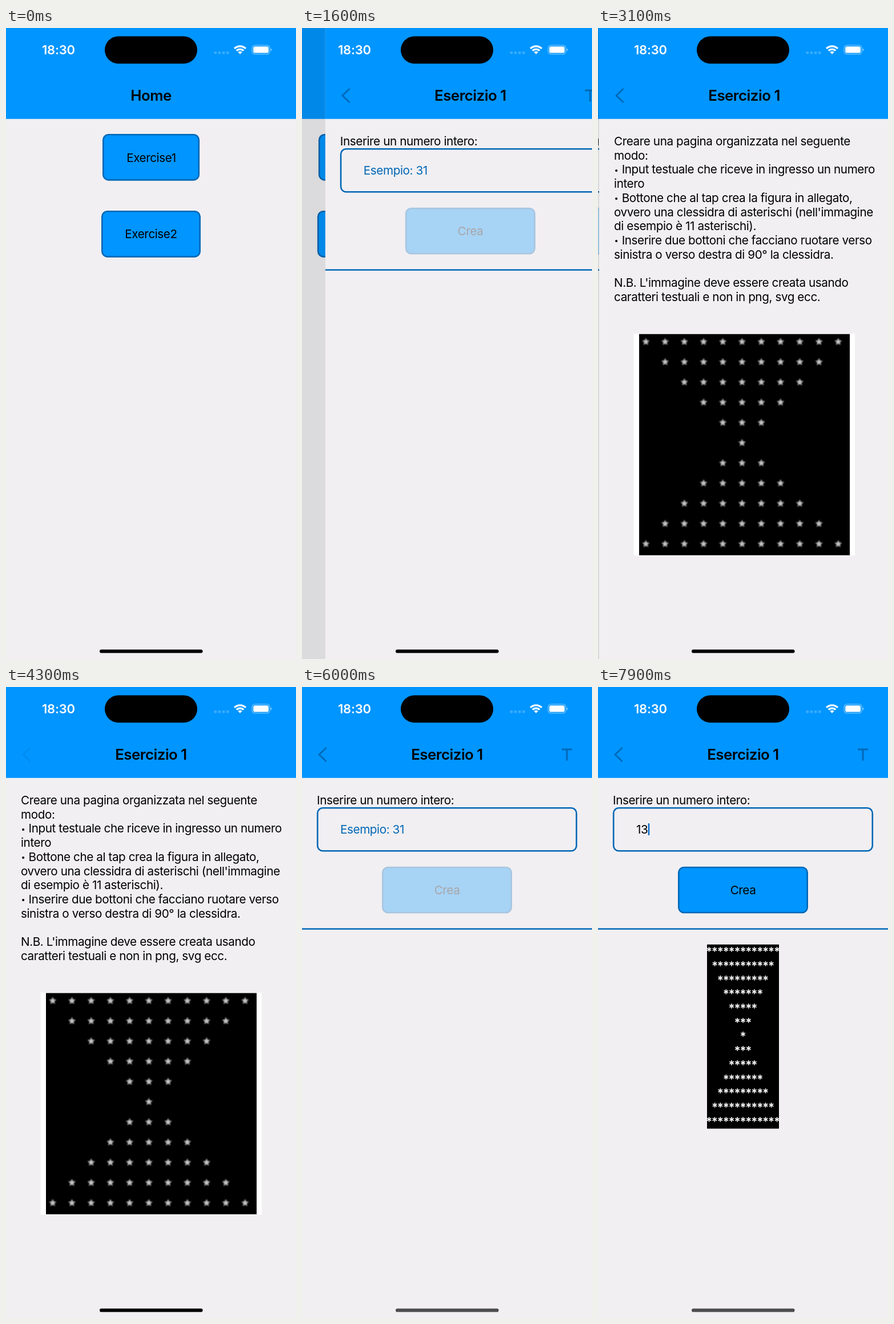
Recreate the animation shown at these times as an HTML page. Size 508 px wide and 1102 px high, loop 8 s.

```html
<!DOCTYPE html>
<html lang="it">
<head>
<meta charset="utf-8">
<title>Esercizio 1</title>
<style>
  html, body { margin: 0; height: 100%; overflow: hidden; background: #f1eff2; }
  svg { display: block; width: 100vw; height: 100vh; }
  text { font: 400 20.68px Inter, "Open Sans", sans-serif; letter-spacing: -.02em; }
  .title { font-size: 25.85px; font-weight: 600; }
  .mid { text-anchor: middle; }
  .clock { font-size: 22px; font-weight: 600; letter-spacing: -.01em; fill: #fff; }
  .page { fill: #f1eff2; }
  .bar { fill: #0095ff; }
  .btn { fill: #0095ff; stroke: #0067b5; stroke-width: 2.6; }
  .icon { fill: none; stroke: #0067b5; stroke-width: 2.6; }
  .stars { font-weight: 600; letter-spacing: -.06em; fill: #fff; }
  .bullet { font-size: 13px; }
</style>
</head>
<body>
<svg viewBox="0 0 508 1102" preserveAspectRatio="none">
  <g id="home">
    <rect class="page" width="508" height="1102"/>
    <rect class="bar" width="508" height="158.8"/>
    <text class="title mid" x="254" y="127">Home</text>
    <g id="first">
      <rect class="btn" x="170.3" y="186.2" width="167.5" height="79.2" rx="9.2"/>
      <text class="mid" x="254.4" y="233.5">Exercise1</text>
    </g>
    <rect class="btn" x="168.3" y="320.2" width="171.4" height="79.2" rx="9.2"/>
    <text class="mid" x="254" y="367">Exercise2</text>
    <rect id="homeShade" width="508" height="1102"/>
  </g>

  <g id="form">
    <rect class="page" width="508" height="1102"/>
    <rect class="bar" width="508" height="158.8"/>
    <path class="icon" d="M42.5 106 30 118 42.5 130"/>
    <text class="title mid" x="254" y="127">Esercizio 1</text>
    <path id="info-icon" class="icon" style="stroke-width:3" d="M455 109H473M464 109V128.5"/>
    <text x="26" y="205">Inserire un numero intero:</text>
    <rect class="icon" x="27.2" y="211.3" width="453.6" height="75" rx="9.2"/>
    <text id="value" x="67" y="256.3"></text>
    <rect id="caret" y="238" width="2.6" height="21" rx="1" fill="#0a6fcc"/>
    <g id="create">
      <rect class="btn" x="141.3" y="315" width="225.4" height="79" rx="9.2"/>
      <text class="mid" x="254" y="362">Crea</text>
    </g>
    <path class="icon" d="M0 422.5H508"/>
    <g id="glass"><rect x="191" y="449.7" width="126" height="321.6"/></g>
    <rect id="formShade" width="508" height="1102"/>
  </g>

  <g id="info">
    <rect class="page" width="508" height="1102"/>
    <rect class="bar" width="508" height="158.8"/>
    <path id="back" class="icon" d="M42.5 106 30 118 42.5 130"/>
    <text class="title mid" x="254" y="127">Esercizio 1</text>
    <g id="lines"></g>
    <rect x="60.5" y="533.5" width="387.5" height="387.8" fill="#fff"/>
    <rect x="70" y="534.5" width="369" height="386.3"/>
    <g id="picture" fill="#c4c4c4" style="filter:blur(1.1px)"></g>
  </g>

  <text class="clock" x="63" y="46">18:30</text>
  <rect x="173" y="14.5" width="162" height="47.8" rx="23.9"/>
  <path d="M364.5 43.2H391" stroke="#fff" stroke-opacity=".22" stroke-width="4.4" stroke-dasharray="4.6 2.6"/>
  <g transform="translate(410 45.8)" fill="none" stroke="#fff" stroke-width="3.2">
    <path d="M-9.9-9.9A14 14 0 0 1 9.9-9.9M-6.2-6.2A8.8 8.8 0 0 1 6.2-6.2"/>
    <path d="M0 0-3.7-3.7A5.3 5.3 0 0 1 3.7-3.7Z" fill="#fff" stroke="none"/>
  </g>
  <rect x="431.1" y="30.1" width="31" height="15.6" rx="5" fill="none" stroke="#fff" stroke-opacity=".45" stroke-width="1.3"/>
  <rect x="433.2" y="32.2" width="26.8" height="11.4" rx="3.2" fill="#fff"/>
  <path d="M463.7 35.3Q465.6 36 465.6 38T463.7 40.6Z" fill="#fff" fill-opacity=".5"/>
  <rect id="grip" x="164" y="1085.4" width="180.6" height="6.2" rx="3.1"/>
</svg>
<script>
const LOOP = 8000, STEP = 100, WIDTH = 508;
const $ = id => document.getElementById(id);
const clamp = v => Math.min(1, Math.max(0, v));

function add(parent, tag, attrs, text = '') {
  const el = document.createElementNS('http://www.w3.org/2000/svg', tag);
  for (const key in attrs) el.setAttribute(key, attrs[key]);
  el.textContent = text;
  parent.append(el);
}

`Creare una pagina organizzata nel seguente
modo:
• Input testuale che riceve in ingresso un numero
intero
• Bottone che al tap crea la figura in allegato,
ovvero una clessidra di asterischi (nell'immagine
di esempio è 11 asterischi).
• Inserire due bottoni che facciano ruotare verso
sinistra o verso destra di 90° la clessidra.

N.B. L'immagine deve essere creata usando
caratteri testuali e non in png, svg ecc.`.split('\n').forEach((line, i) => {
  const y = 205 + i * 24.7, listed = line.startsWith('•');
  if (listed) add($('lines'), 'text', { class: 'bullet', x: 26.5, y: y - 1.8 }, '•');
  add($('lines'), 'text', { x: listed ? 39.6 : 26, y }, listed ? line.slice(2) : line);
});

// Five-pointed star used in the example picture
const star = Array.from({ length: 10 }, (_, i) => {
  const r = i % 2 ? 3.2 : 6.8, a = i * Math.PI / 5;
  return [r * Math.sin(a), -r * Math.cos(a)].map(v => v.toFixed(1));
}).join(' ');

for (let row = -5; row <= 5; row++)
  for (let col = -Math.abs(row); col <= Math.abs(row); col++)
    add($('picture'), 'polygon', {
      points: star,
      transform: `translate(${250.3 + col * 33.7} ${724.5 + row * 35.3})`
    });

for (let row = 0; row < 13; row++)
  add($('glass'), 'text', { class: 'mid stars', x: 253.4, y: 469.2 + row * 24.7 },
    '*'.repeat(2 * Math.abs(row - 6) + 1));

// Critically damped spring from 0 to 1
function spring(ms) {
  const x = Math.max(0, ms) * .0185;
  return 1 - (1 + x) * Math.exp(-x);
}

// Opacity of a touchable held from down to up
const touch = (t, down, up) => t < down ? 1 : t < up ? .2 : .2 + .8 * clamp((t - up) / 200);

const blink = ms => Math.max(clamp((600 - ms) / 200), clamp((ms - 700) / 300));

function slide(id, x) {
  $(id).setAttribute('transform', `translate(${x.toFixed(2)} 0)`);
}

function draw(t) {
  const formIn = spring(t - 1375);
  const infoIn = spring(t - 2685) * (1 - spring(t - 4330));
  slide('home', -.3 * WIDTH * formIn);
  slide('form', WIDTH * (1 - formIn) - .3 * WIDTH * infoIn);
  slide('info', WIDTH * (1 - infoIn));
  $('homeShade').style.opacity = .1 * formIn;
  $('formShade').style.opacity = .1 * infoIn;

  $('first').style.opacity = touch(t, 1200, 1400);
  $('info-icon').style.opacity = touch(t, 2600, 2800);
  $('back').style.opacity = touch(t, 4200, 4400);

  const typed = t < 6600 ? '' : t < 6800 ? '1' : '13';
  $('value').textContent = typed || 'Esempio: 31';
  $('value').setAttribute('fill', typed ? '#000' : '#0067b5');
  $('caret').setAttribute('x', [67, 76.5, 87.7][typed.length]);
  $('caret').style.opacity = t < 5300 ? 0 : blink(t - [5400, 6600, 6800][typed.length]);

  $('create').style.opacity = typed ? touch(t, 7600, 7700) : .3;
  $('glass').style.display = t < 7700 ? 'none' : '';

  const grey = Math.round(76 * clamp((t - 5200) / 200));
  $('grip').setAttribute('fill', `rgb(${grey},${grey},${grey + grey / 25})`);
}

const start = performance.now();
function tick() {
  const t = (performance.now() - start) % LOOP;
  draw(Math.floor(t / STEP) * STEP);
  requestAnimationFrame(tick);
}
tick();
</script>
</body>
</html>
```
